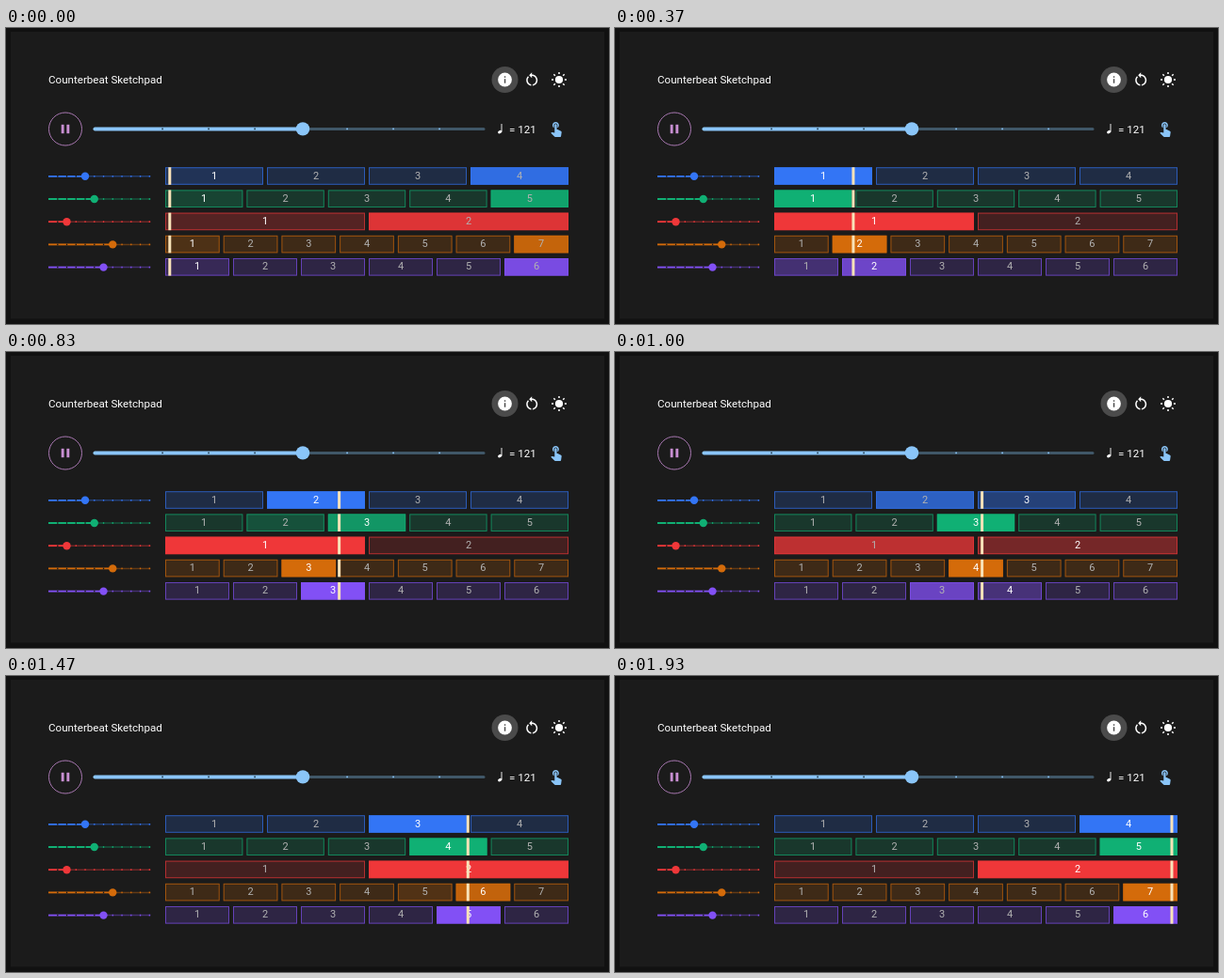
Animation of 640 by 315 pixels, one loop 1960 ms. Source, as an HTML page with a canvas:

```html
<!DOCTYPE html>
<html lang="en">
<head>
<meta charset="utf-8">
<title>Counterbeat Sketchpad</title>
<style>
html, body { margin: 0; width: 100%; height: 100%; overflow: hidden; background: #111; }
canvas { display: block; width: 640px; height: 315px; }
</style>
</head>
<body>
<canvas id="stage"></canvas>
<script>
const W = 640, H = 315, LOOP = 1960, STEP = 100 / 3;
const CYCLE = 4 * 60000 / 121;   // one bar at 121 bpm
const FADE = 90, LEAD = 4;
const PANEL = '#1b1b1b', SKY = '#8ac5f8', PINK = '#c88fd2';
const FONT = 'Roboto, Arial, sans-serif';
const LEFT = 169, SPAN = 432, GAP = 4;

const rows = [
  { n: 4, rgb: '51,117,245' },
  { n: 5, rgb: '16,176,116' },
  { n: 2, rgb: '239,55,57' },
  { n: 7, rgb: '212,107,10' },
  { n: 6, rgb: '130,80,245' }
];
rows.forEach((r, i) => { r.y = 157.5 + 24.2 * i; });

const restart = new Path2D('M12 5V2L8 6l4 4V7c3.31 0 6 2.69 6 6 0 2.97-2.17 5.43-5 5.91v2.02c3.95-.49 7-3.85 7-7.93 0-4.42-3.58-8-8-8zm-6 8c0-1.65.67-3.15 1.76-4.24L6.34 7.34C4.9 8.79 4 10.79 4 13c0 4.08 3.05 7.44 7 7.93v-2.02c-2.83-.48-5-2.94-5-5.91z');
const hand = new Path2D('M9 11.24V7.5C9 6.12 10.12 5 11.5 5S14 6.12 14 7.5v3.74c1.21-.81 2-2.18 2-3.74C16 5.01 13.99 3 11.5 3S7 5.01 7 7.5c0 1.56.79 2.93 2 3.74zm9.84 4.63l-4.54-2.26c-.17-.07-.35-.11-.54-.11H13v-6c0-.83-.67-1.5-1.5-1.5S10 6.67 10 7.5v10.74l-3.43-.72c-.08-.01-.15-.03-.24-.03-.31 0-.59.13-.79.33l-.79.8 4.94 4.94c.27.27.65.44 1.06.44h6.79c.75 0 1.33-.55 1.44-1.28l.75-5.27c.01-.07.02-.14.02-.2 0-.62-.38-1.16-.91-1.38z');

const canvas = document.getElementById('stage');
const ctx = canvas.getContext('2d');
const dpr = window.devicePixelRatio || 1;
canvas.width = W * dpr;
canvas.height = H * dpr;

function rect(x, y, w, h, fill) {
  ctx.fillStyle = fill;
  ctx.fillRect(x, y, w, h);
}

function disc(x, y, r, fill) {
  ctx.fillStyle = fill;
  ctx.beginPath();
  ctx.arc(x, y, r, 0, 2 * Math.PI);
  ctx.fill();
}

function line(x1, y1, x2, y2, width, color) {
  ctx.strokeStyle = color;
  ctx.lineWidth = width;
  ctx.beginPath();
  ctx.moveTo(x1, y1);
  ctx.lineTo(x2, y2);
  ctx.stroke();
}

function text(str, x, y, size, color, align = 'left') {
  ctx.font = `${size}px ${FONT}`;
  ctx.textAlign = align;
  ctx.textBaseline = 'alphabetic';
  ctx.fillStyle = color;
  ctx.fillText(str, x, y);
}

function icon(path, x, y, scale, color) {
  ctx.save();
  ctx.translate(x, y);
  ctx.scale(scale, scale);
  ctx.fillStyle = color;
  ctx.fill(path);
  ctx.restore();
}

function header() {
  text('Counterbeat Sketchpad', 45, 59.2, 11.6, '#fff');

  disc(529.5, 55, 14, '#4b4b4b');
  disc(529.5, 55, 7.4, '#fff');
  rect(528.8, 51.3, 1.5, 1.5, '#4b4b4b');
  rect(528.8, 54.2, 1.5, 4.5, '#4b4b4b');

  icon(restart, 549.2, 45.8, 0.75, '#fff');

  disc(587, 55, 4.1, '#fff');
  for (let i = 0; i < 8; i++) {
    const c = Math.cos(i * Math.PI / 4), s = Math.sin(i * Math.PI / 4);
    line(587 + 5.9 * c, 55 + 5.9 * s, 587 + 8 * c, 55 + 8 * s, 1.5, '#fff');
  }
}

function transport() {
  ctx.strokeStyle = '#a877b1';
  ctx.lineWidth = 1;
  ctx.beginPath();
  ctx.arc(63, 107.5, 17.5, 0, 2 * Math.PI);
  ctx.stroke();
  rect(58.7, 102.8, 2.9, 9.4, PINK);
  rect(64.4, 102.8, 2.9, 9.4, PINK);

  ctx.lineCap = 'round';
  line(94, 107.4, 507, 107.4, 3, '#405768');
  line(94.5, 107.4, 315, 107.4, 4, SKY);
  ctx.lineCap = 'butt';
  for (let i = 0; i < 7; i++) {
    rect(165.3 + 49 * i, 106.6, 1.6, 1.6, i < 3 ? '#23394a' : SKY);
  }
  disc(315, 107.4, 7.2, SKY);

  ctx.fillStyle = '#fff';
  ctx.beginPath();
  ctx.ellipse(524.2, 110.6, 2.2, 1.6, -0.4, 0, 2 * Math.PI);
  ctx.fill();
  line(526, 102, 526, 110.4, 0.9, '#fff');
  text('= 121', 534, 111.5, 11.6, '#fff');
  icon(hand, 574.7, 97.7, 0.76, SKY);
}

function counter({ n, rgb, y }) {
  const color = `rgb(${rgb})`, x = 45 + 9.75 * n;
  line(45, y + 0.3, 153.5, y + 0.3, 1.5, `rgba(${rgb},.4)`);
  line(45, y + 0.3, x, y + 0.3, 1.8, color);
  for (let i = 1; i <= 11; i++) {
    rect(44.4 + 9.75 * i, y - 0.5, 1.3, 1.6, i < n ? PANEL : color);
  }
  disc(x, y + 0.3, 4.2, color);
}

const ease = p => 1 - Math.pow(1 - p, 2.3);

function cells({ n, rgb, y }, t) {
  const beat = CYCLE / n, pitch = SPAN / n;
  const s = (t + LEAD) % CYCLE;
  const now = Math.floor(s / beat);
  const last = (now + n - 1) % n;
  const glow = ease(Math.min(1, (s - now * beat) / FADE));
  for (let i = 0; i < n; i++) {
    const x = LEFT + i * pitch, w = pitch - GAP;
    const lit = i === now ? glow : i === last ? 1 - glow : 0;
    rect(x, y - 9.3, w, 18.6, `rgba(${rgb},${0.19 + 0.81 * lit})`);
    ctx.strokeStyle = `rgba(${rgb},.65)`;
    ctx.lineWidth = 1;
    ctx.strokeRect(x + 0.5, y - 8.8, w - 1, 17.6);
    text(i + 1, x + w / 2, y + 3.1, 11, i === now ? '#fff' : '#b2b2b2', 'center');
  }
}

function draw(t) {
  ctx.setTransform(dpr, 0, 0, dpr, 0, 0);
  rect(0, 0, W, H, '#111');
  rect(5, 4, 630, 305.5, PANEL);
  header();
  transport();
  const head = 173.8 + t * (SPAN - GAP) / CYCLE;
  for (const row of rows) {
    counter(row);
    cells(row, t);
    rect(head - 1.5, row.y - 9.3, 3, 18.6, '#f8e2b8');
  }
}

// The picture advances thirty times a second, on 10 ms ticks.
const start = performance.now();
function frame() {
  const t = (performance.now() - start) % LOOP;
  const tick = Math.floor((Math.floor(t / 10) * 10 + 5) / STEP);
  draw(tick * STEP);
  requestAnimationFrame(frame);
}
frame();
</script>
</body>
</html>
```
